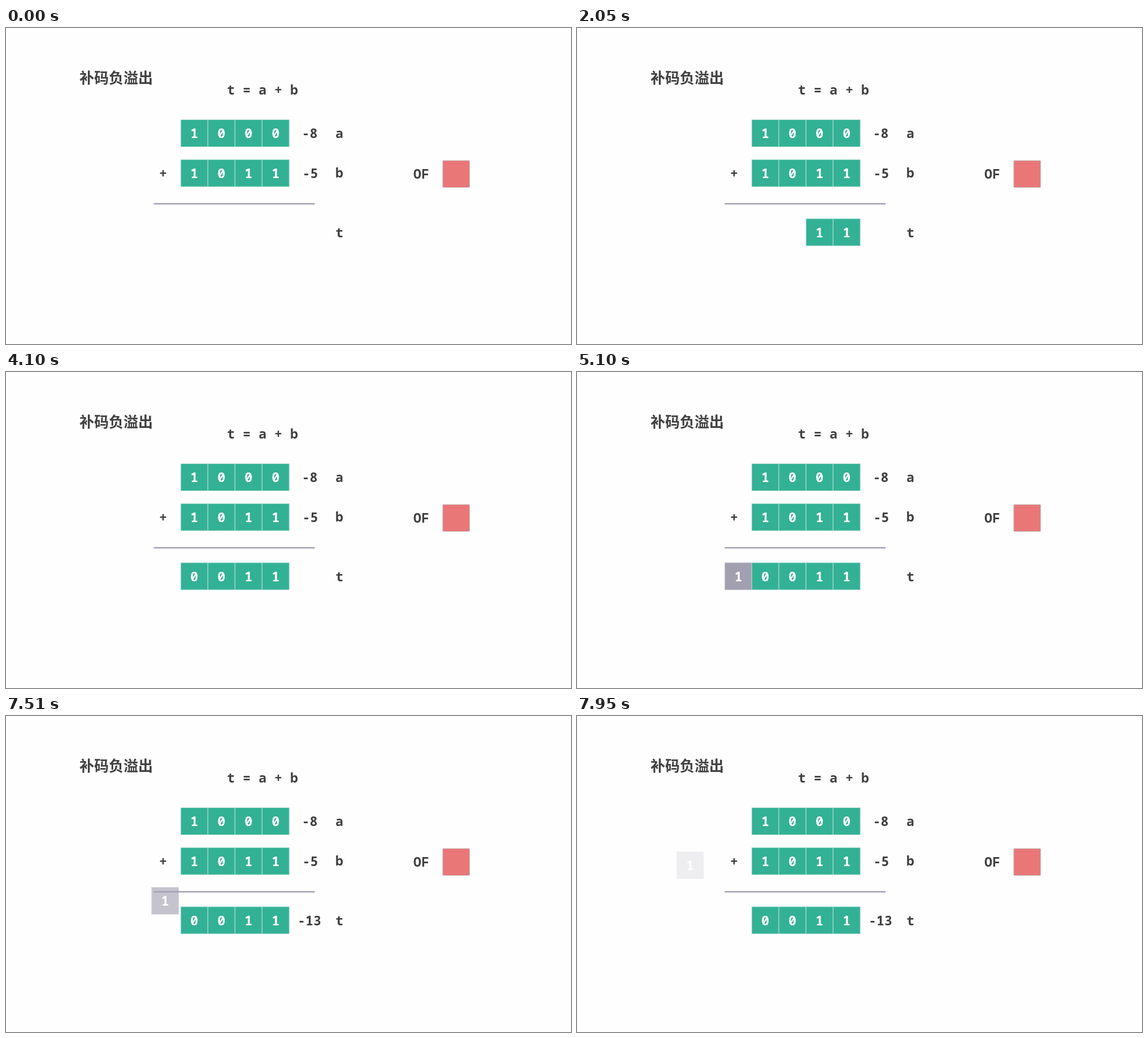
These frames come from a looping animation (1000 by 560 pixels, 8000 ms). An HTML page:

```html
<!DOCTYPE html>
<html lang="zh-CN">
<head>
<meta charset="utf-8">
<style>
  html, body { margin: 0; width: 100%; height: 100%; overflow: hidden; background: #fefefe; }
  svg { display: block; width: 1000px; height: 560px; }
  text { font: bold 23.3px "Noto Sans Mono", monospace; fill: #404040; text-anchor: middle; white-space: pre; }
  .title { font: bold 26px "Noto Sans CJK SC", "Noto Sans CJK", sans-serif; text-anchor: start; }
  .cell text { fill: #fff; }
</style>
</head>
<body>
<svg viewBox="0 0 1000 560"></svg>
<script>
const LOOP = 8000, CARRY_START = 7150, CARRY_STEP = 40;
const GREEN = '#33b195', GREY = '#a29fb0', CELL = 48;
const svg = document.querySelector('svg');

function add(tag, attrs, parent = svg) {
  const node = document.createElementNS('http://www.w3.org/2000/svg', tag);
  for (const key in attrs) node.setAttribute(key, attrs[key]);
  return parent.appendChild(node);
}

function label(content, x, y, attrs = {}, parent = svg) {
  const node = add('text', { x, y, ...attrs }, parent);
  node.textContent = content;
  return node;
}

function cell(bit, x, y, fill = GREEN, stroke = '#b4e2d7') {
  const group = add('g', { class: 'cell' });
  add('rect', { x, y, width: CELL, height: CELL, fill, stroke }, group);
  label(bit, x + CELL / 2, y + 32.5, {}, group);
  return group;
}

const row = (bits, y) => [...bits].map((bit, i) => cell(bit, 309.3 + i * CELL, y));

// The carry lies beneath the rule and the sum.
const carry = cell('1', 261.7, 338, GREY, '#c9c7d2');

label('补码负溢出', 130, 97.5, { class: 'title' });
label('t = a + b', 454, 118);

row('1000', 162.5);
label('-8', 537.5, 195);
label('a', 590, 195);

label('+', 278, 265.5);
row('1011', 233.2);
label('-5', 538.5, 265.5);
label('b', 590, 264.5);

add('line', { x1: 261.5, x2: 546.5, y1: 311.5, y2: 311.5, stroke: GREY, 'stroke-width': 2.4 });

const sum = row('0011', 338);
const total = label('-13', 537, 370.5);
label('t', 590, 370.5);

label('OF', 735, 267);
add('rect', { x: 773, y: 235, width: 47.5, height: 47.5, rx: 1, fill: '#e97777', stroke: '#bdb7b7' });

const reveals = [
  [sum[3], 1050], [sum[2], 2050], [sum[1], 3100],
  [sum[0], 4100], [carry, 5100], [total, 6150],
];

// Time and offset of the carry along its curved way out.
const path = [
  [7110, 0, 0], [7190, -6, -5], [7350, -13, -18], [7510, -4, -34.5],
  [7710, -23, -75], [7870, -71, -95], [7950, -85.5, -97.5],
];

function slope(i, axis) {
  if (i === 0) return 0;
  const before = path[i - 1], after = path[Math.min(i + 1, path.length - 1)];
  return (after[axis] - before[axis]) / (after[0] - before[0]);
}

function along(time, axis) {
  let i = 0;
  while (i < path.length - 2 && time >= path[i + 1][0]) i++;
  const span = path[i + 1][0] - path[i][0];
  const u = (time - path[i][0]) / span, v = 1 - u;
  return v * v * (1 + 2 * u) * path[i][axis] + u * u * (3 - 2 * u) * path[i + 1][axis]
    + span * u * v * (v * slope(i, axis) - u * slope(i + 1, axis));
}

function draw(time) {
  for (const [node, start] of reveals)
    node.setAttribute('visibility', time >= start ? 'visible' : 'hidden');

  const step = Math.min(20, Math.floor((time - CARRY_START) / CARRY_STEP));
  const moment = CARRY_START + step * CARRY_STEP;
  const moving = step >= 0;
  const x = moving ? along(moment, 1) : 0;
  const y = moving ? along(moment, 2) : 0;
  carry.setAttribute('transform', `translate(${x} ${y})`);
  carry.setAttribute('opacity', moving ? 1 - (moment - 7120) / 1000 : 1);
}

const began = performance.now();
function tick() {
  draw((performance.now() - began) % LOOP);
  requestAnimationFrame(tick);
}
tick();
</script>
</body>
</html>
```
